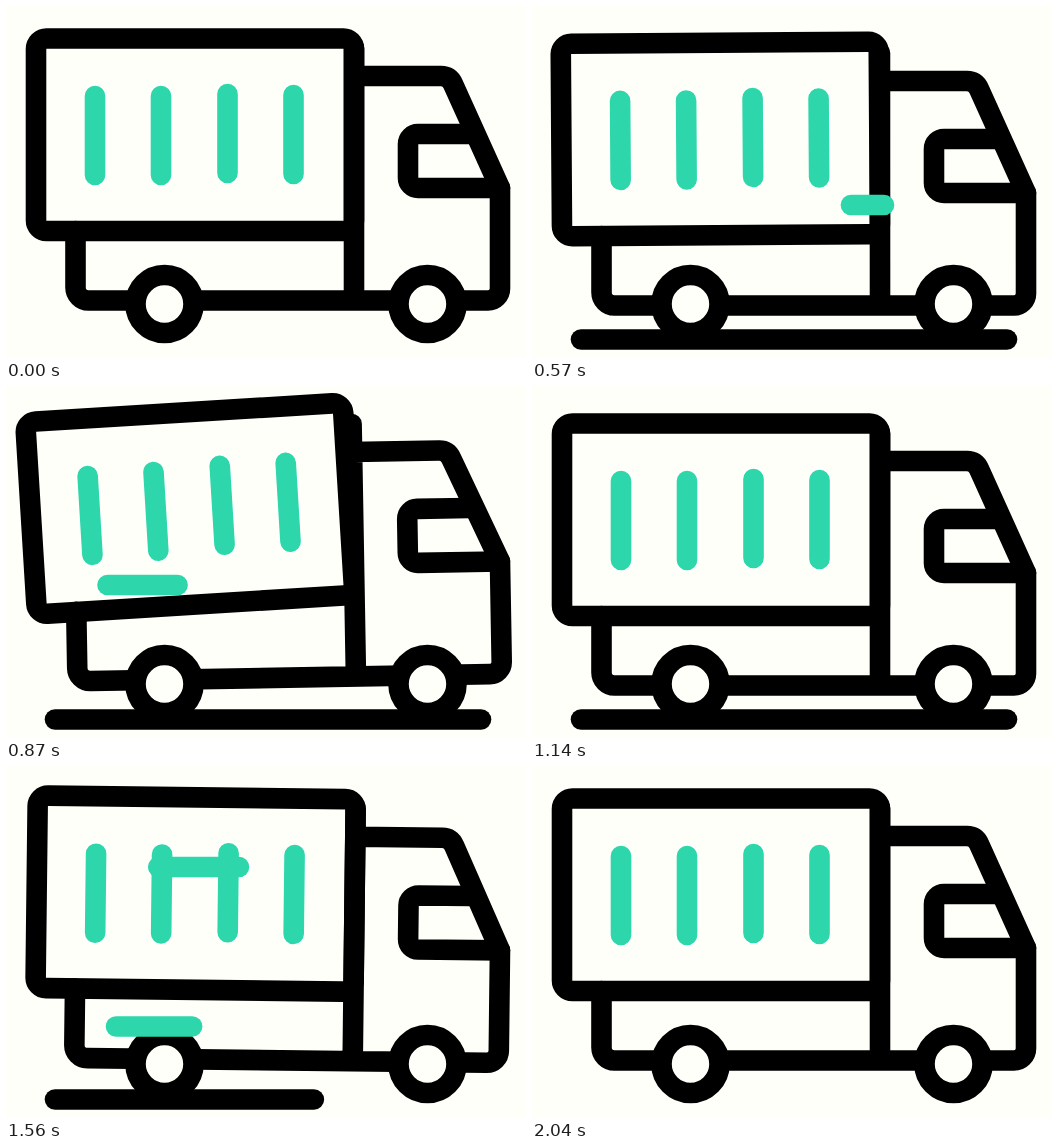
An HTML page for the animation above (2.1 s loop, 520 by 352 pixels).

```html
<!DOCTYPE html>
<html lang="en">
<head>
<meta charset="utf-8">
<title>Delivery truck</title>
<style>
html, body { margin: 0; width: 100%; height: 100%; overflow: hidden; background: #fffffa; }
svg { display: block; width: 520px; height: 352px; }
svg * { stroke-width: 20.6; stroke-linecap: round; stroke-linejoin: round; }
</style>
</head>
<body>
<svg viewBox="0 0 520 352" fill="none" stroke="#000">
  <g id="body">
    <path d="M348 42V294.5M69.500 225V281.500A13 13 0 0 0 82.500 294.500H482A12 12 0 0 0 494 282.500V182L447 78Q443.500 70 435 70H348"/>
    <path d="M464 128H412A10 10 0 0 0 402 138V172A10 10 0 0 0 412 182H494"/>
    <g id="box">
      <rect x="30" y="32.5" width="318" height="192.5" rx="10.5"/>
      <path stroke="#2dd6ab" d="M89 90V169M155 90V169M221.500 88V167M287.500 89V168"/>
    </g>
  </g>
  <g fill="#fffffa">
    <circle cx="158.5" cy="298" r="29"/>
    <circle cx="421.5" cy="298" r="29"/>
  </g>
  <path id="ground"/>
  <g stroke="#2dd6ab">
    <path id="wind1"/>
    <path id="wind2"/>
    <path id="wind3"/>
  </g>
</svg>
<script>
const LOOP = 2100;
const $ = id => document.getElementById(id);
const ease = p => 0.5 - 0.5 * Math.cos(Math.PI * Math.min(1, Math.max(0, p)));
const ramp = (t, from, to) => ease((t - from) / (to - from));

// keys: [time, value] pairs, eased in between
function track(t, keys) {
  let value = keys[0][1];
  for (let i = 1; i < keys.length; i++) {
    const [t0, v0] = keys[i - 1], [t1, v1] = keys[i];
    if (t >= t0) value = v0 + (v1 - v0) * ramp(t, t0, t1);
  }
  return value;
}

const lift = [[0, 0], [515, 5], [560, 5], [850, -3], [1130, 5], [1350, 5], [1690, -2.4], [2040, 0]];
const tilt = [[0, 0], [550, 0], [850, -1], [1130, 0], [1360, 0], [1690, 1], [2040, 0]];
const swing = [[0, 0], [500, 0], [800, -2.9], [1100, 0]];

// strokes that grow and then vanish from right to left
const streaks = [
  { id: "ground", y: 333.5, x: [475, 49], head: [120, 540], tail: [1380, 1800] },
  { id: "wind1", y: 199, x: [352, 101.5], head: [500, 800], tail: [600, 1020] },
  { id: "wind2", y: 101, x: [338, 100], head: [1370, 1647], tail: [1450, 1690] },
  { id: "wind3", y: 260.5, x: [319, 110], head: [1260, 1563], tail: [1420, 1660] }
];

function draw() {
  const t = performance.now() % LOOP;
  $("body").setAttribute("transform", `translate(0 ${track(t, lift)}) rotate(${track(t, tilt)} 282 182)`);
  $("box").setAttribute("transform", `rotate(${track(t, swing)} 73 222)`);
  for (const { id, y, x: [x0, x1], head, tail } of streaks) {
    const left = x0 + (x1 - x0) * ramp(t, ...head);
    const right = x0 + (x1 - x0) * ramp(t, ...tail);
    $(id).setAttribute("d", right - left > 0.01 ? `M${right} ${y}H${left}` : "");
  }
  requestAnimationFrame(draw);
}
draw();
</script>
</body>
</html>
```
